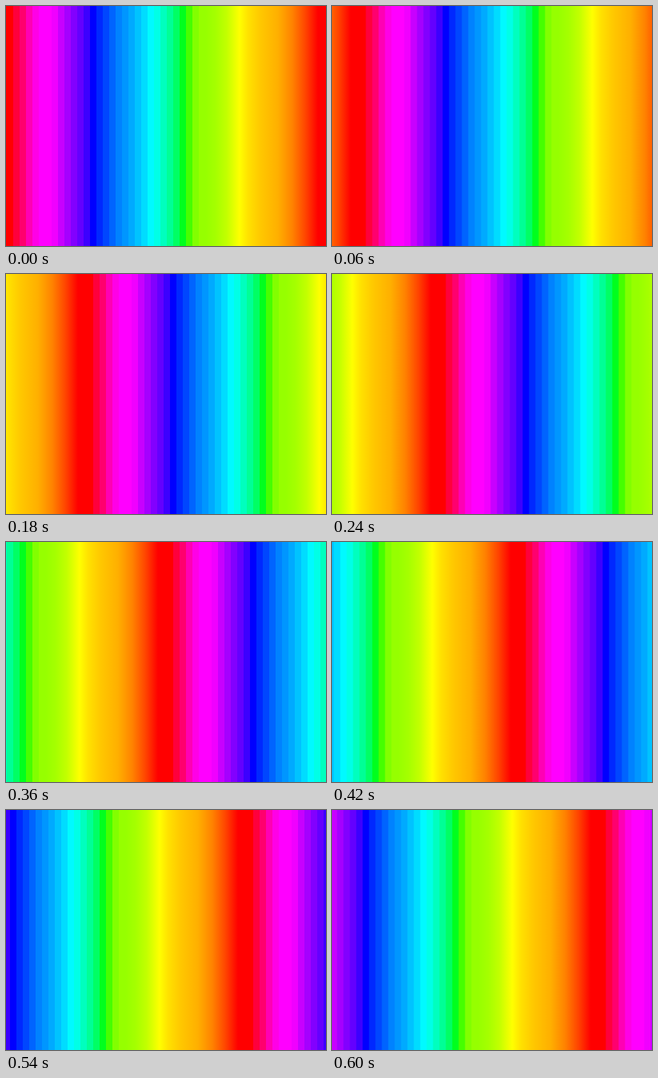
Write an HTML page without scripts that moves like this. It is 400 px wide and 300 px high and loops after 660 ms.

```html
<!DOCTYPE html>
<html lang="en">
<head>
<meta charset="utf-8">
<title>Rainbow scroll</title>
<style>
  html, body {
    margin: 0;
    width: 100%;
    height: 100%;
    overflow: hidden;
  }

  /* Hard bands from red to lime, then a smooth run through yellow back to red.
     A stop starting at 0 begins where the previous band ends. */
  .rainbow {
    width: 400px;
    height: 300px;
    background: linear-gradient(90deg,
      #f00 9px,
      #ff003c 0 17px,
      #ff006e 0 25px,
      #ff00b4 0 33px,
      #ff00e6 0 41px,
      #f0f 0 57px,
      #f000ff 0 65px,
      #c800ff 0 73px,
      #a500ff 0 81px,
      #8200ff 0 89px,
      #6400ff 0 97px,
      #3c00ff 0 105px,
      #00f 0 113px,
      #0028ff 0 121px,
      #0046ff 0 129px,
      #0064ff 0 137px,
      #0082ff 0 145px,
      #0096ff 0 153px,
      #00aaff 0 161px,
      #00c3ff 0 169px,
      #00dcff 0 177px,
      #00faff 0 185px,
      #00ffe6 0 193px,
      #00ffbe 0 201px,
      #00ff96 0 209px,
      #00ff64 0 217px,
      #00ff1e 0 225px,
      #46ff00 0 233px,
      #82ff00 0 241px,
      #96ff00 0 249px,
      #a5ff00 262px,
      #c3ff00 276px,
      #ff0 292px,
      #ffe100 303px,
      #ffc800 318px,
      #ffaf00 340px,
      #ff8200 358px,
      #ff4600 374px,
      #f00 390px) 0 0 / 400px 300px repeat-x;
    animation: scroll 660ms steps(11) infinite;
  }

  /* A twelfth of the width per step; the last twelfth is skipped on restart. */
  @keyframes scroll {
    to { background-position-x: calc(400px * 11 / 12); }
  }
</style>
</head>
<body>
<div class="rainbow"></div>
</body>
</html>
```
